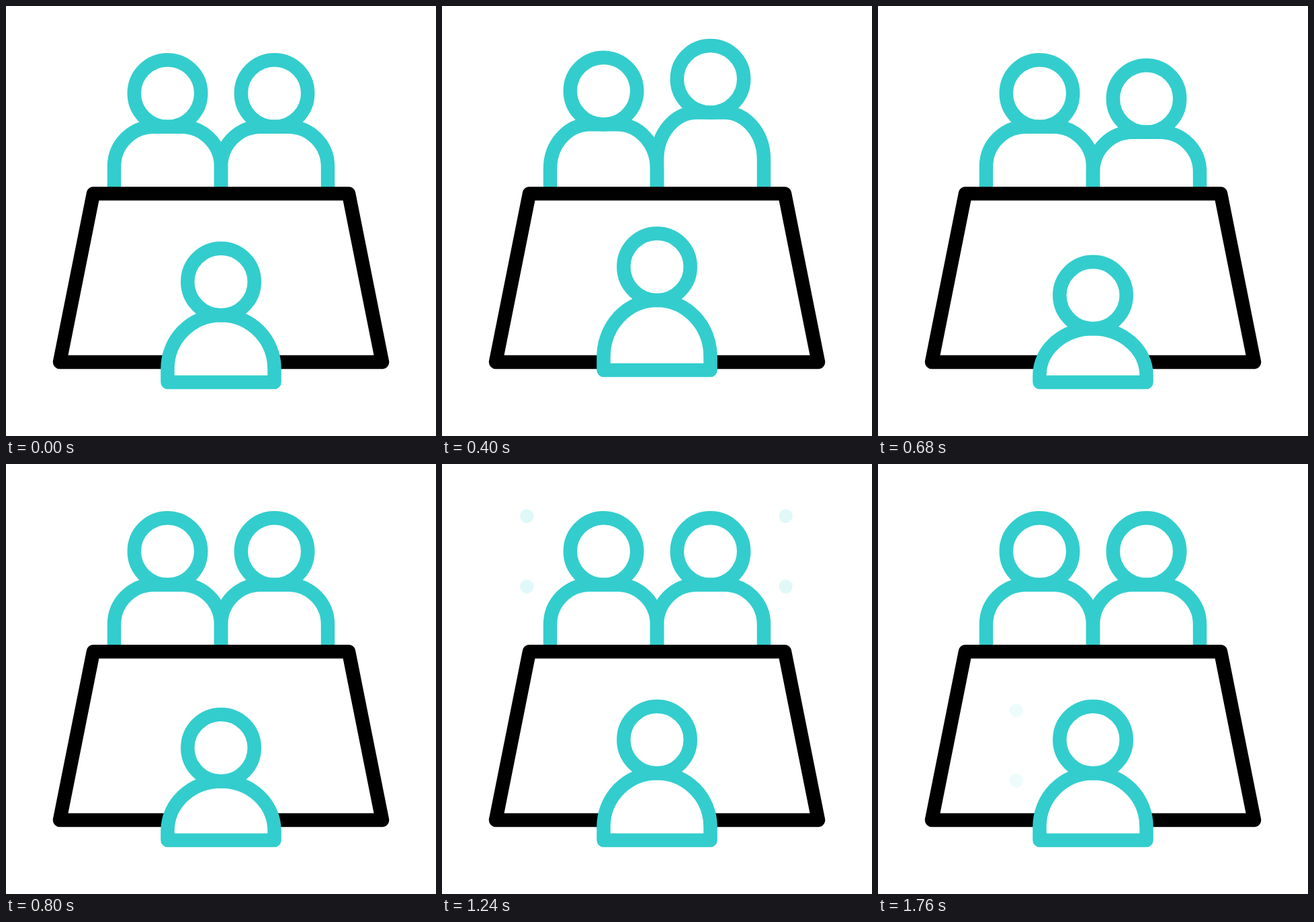
An HTML page that plays this animation: 640 px wide and 640 px high, repeating every 2 s.

```html
<!DOCTYPE html>
<html lang="en">
<head>
<meta charset="utf-8">
<title>Meeting</title>
<style>
  html, body { margin: 0; width: 100%; height: 100%; overflow: hidden; background: #fff; }
  svg { display: block; width: 100vw; height: 100vh; }
  .teal, .table { fill: none; stroke: #33cdcd; stroke-width: 20.5; stroke-linejoin: round; }
  .table { stroke: #000; }
  .front path { fill: #fff; }
  .rays { stroke-linecap: round; }
</style>
</head>
<body>
<svg viewBox="0 0 640 640">
  <g class="teal" id="left"><path/><circle r="49.7"/></g>
  <g class="teal" id="right"><path/><circle r="49.7"/></g>
  <path class="table" d="M130 279.3H510L560 530H80Z"/>
  <g class="teal front" id="front"><path/><circle r="49.7"/></g>
  <path class="teal rays" id="backRays"/>
  <path class="teal rays" id="frontRays"/>
</svg>
<script>
const FRAME = 40, LOOP = 2000, LAST = 44;
const $ = id => document.getElementById(id);
const clamp = x => Math.min(1, Math.max(0, x));

const linear = p => p;
const smooth = p => (1 - Math.cos(Math.PI * p)) / 2;
const soft = p => p + 0.15 * p * (1 - p);

// Each key is [frame, value, easing into this key].
function track(keys, f) {
  if (f <= keys[0][0]) return keys[0][1];
  for (let i = 1; i < keys.length; i++) {
    const [f0, v0] = keys[i - 1], [f1, v1, ease = linear] = keys[i];
    if (f <= f1) return v0 + (v1 - v0) * ease((f - f0) / (f1 - f0));
  }
  return keys[keys.length - 1][1];
}

// Lift above the resting pose, in pixels.
const back = {
  top: [[2, 0], [7, 39, soft], [13, -32, smooth], [17, 0]],
  shoulder: [[2, 0], [4, 17], [7, 24], [13, -30, smooth], [17, 0]]
};
const front = {
  top: [[7, 0], [12, 35, soft], [18, -24, smooth], [22, 0]],
  shoulder: [[7, 0], [10, 18], [12, 24], [18, -12, smooth], [22, 0]],
  foot: [[7, 0], [10, 18], [12, 24], [15.5, 0, smooth]]
};

// Body outline: legs at cx -+ 79.5, with a flat of half-width "flat" on top.
function body(cx, top, shoulder, foot, flat) {
  const w = 79.5, k = 0.5523, rx = w - flat, ry = shoulder - top;
  const l = cx - w, r = cx + w;
  return `M${l} ${foot}V${shoulder}` +
    `C${l} ${shoulder - k * ry} ${cx - flat - k * rx} ${top} ${cx - flat} ${top}H${cx + flat}` +
    `C${cx + flat + k * rx} ${top} ${r} ${shoulder - k * ry} ${r} ${shoulder}V${foot}`;
}

function person(id, cx, headY, top, outline) {
  const [path, head] = $(id).children;
  path.setAttribute('d', outline);
  head.setAttribute('cx', cx);
  head.setAttribute('cy', headY - top);
}

function sitter(id, cx, f) {
  const top = track(back.top, f), shoulder = track(back.shoulder, f);
  person(id, cx, 130, top, body(cx, 179.7 - top, 239 - shoulder, 279, 20.5));
}

function speaker(f) {
  const top = track(front.top, f), shoulder = track(front.shoulder, f);
  const foot = track(front.foot, f);
  person('front', 320, 410.5, top,
    body(320, 460.2 - top, 540 - shoulder, 560 - foot, 0) + 'Z');
}

// A pair of diagonal strokes running outward, mirrored about y.
function rays(x, y, gap, reach, dir, p) {
  const head = reach * clamp(p / 0.53), tail = reach * smooth(clamp((p - 0.5) / 0.42));
  const stroke = s =>
    `M${x + dir * tail} ${y + s * (gap + tail)}L${x + dir * (head + 0.01)} ${y + s * (gap + head)}`;
  return stroke(-1) + stroke(1);
}

function showRays(id, p, d) {
  $(id).setAttribute('d', d);
  $(id).setAttribute('opacity', p <= 0 ? 0 : clamp((0.953 - p) / 0.3));
}

function draw(now) {
  const f = Math.min(LAST, Math.floor((now % LOOP) / FRAME));
  sitter('left', 240.5, f);
  sitter('right', 399.5, f - 1);
  speaker(f);

  const pb = (f - 21) / 11, pf = (f - 31) / 14;
  showRays('backRays', pb,
    rays(158.8, 130, 20, 32.5, -1, pb) + rays(479.2, 130, 20, 32.5, 1, pb));
  showRays('frontRays', pf, rays(235, 419, 23, 29.2, -1, pf));
}

let start;
function tick(now) {
  if (start === undefined) start = now;
  draw(now - start);
  requestAnimationFrame(tick);
}
draw(0);
requestAnimationFrame(tick);
</script>
</body>
</html>
```
